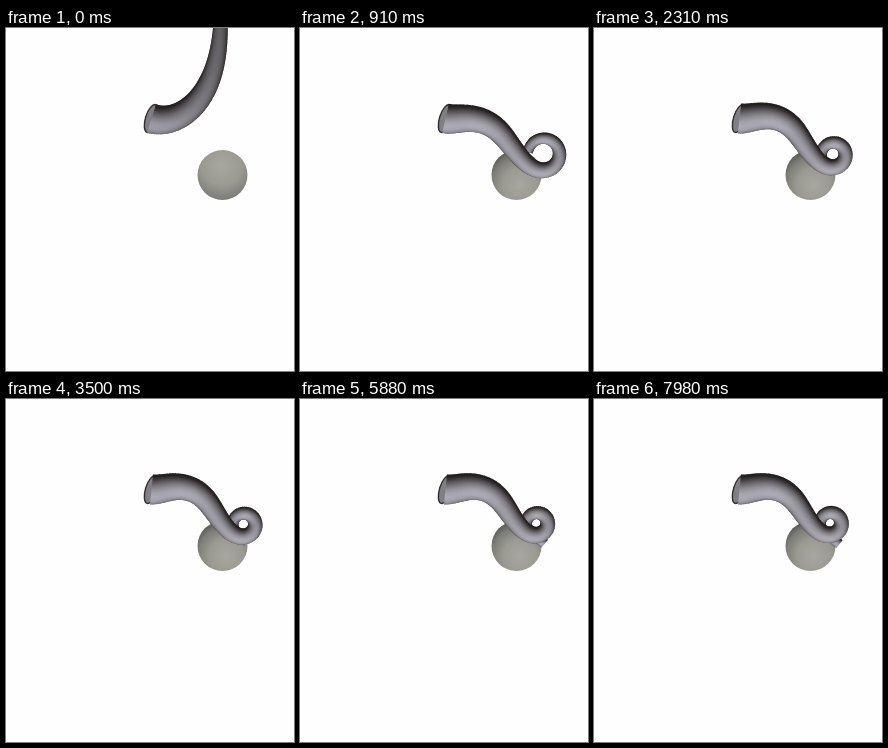
Recreate the animation shown at these times as an HTML page with a canvas. Size 288x343 px, loop 8 s.

```html
<!DOCTYPE html>
<html lang="en">
<head>
<meta charset="utf-8">
<title>Curling tentacle</title>
<style>
html, body { margin: 0; width: 100%; height: 100%; overflow: hidden; background: #fefefe; }
canvas { display: block; width: 288px; height: 343px; }
</style>
</head>
<body>
<canvas id="stage" width="288" height="343"></canvas>
<script>
const ctx = document.getElementById('stage').getContext('2d');
const LOOP = 8000, STEP = 70, FALL = 140, LANDED = 350;
const N = 150, LENGTH = 191;
const ROOT = { x: 145.5, y: 90.5 };
const LIGHT = { x: -0.1, y: 0.52, z: 0.85 };
const DARK = [36, 31, 31], PALE = [172, 171, 181];

const mix = (a, b, k) => a + (b - a) * k;
const clamp = v => Math.max(0, Math.min(1, v));
const smooth = (a, b, v) => {
  const k = clamp((v - a) / (b - a));
  return k * k * (3 - 2 * k);
};

const radius = s => 5 + 10 * (1 - s) ** 1.3;

// Headings along the tentacle, s running from root (0) to tip (1).
const raised = s => 0.3 - 2.1 * (1 - Math.exp(-3 * s));

// The arm sags, then winds up; loose goes from 1 (open hook) to 0 (tight coil).
function lowered(s, loose) {
  const open = loose * loose, soft = 0.04;
  const from = 0.53 + 0.1 * loose - 0.135 * open;
  const sag = -0.2 + 0.4 * open + (1.2 - 0.65 * open) * smooth(0.05, 0.38, s);
  const coil = (18 - 10.6 * loose) * soft * Math.log(1 + Math.exp((s - from) / soft));
  return Math.max(sag - coil, -5.6) + 0.3 * Math.exp(-s / 0.02);
}

function headingAt(t) {
  const drop = t < FALL ? 0 : clamp((t - FALL + STEP) / (LANDED - FALL + STEP));
  const since = Math.max(0, t - LANDED);
  const loose = Math.exp(-((since / 1100) ** 0.8));
  const swing = 0.07 * Math.sin(Math.PI * clamp(since / 350));
  return s => mix(raised(s), lowered(s, loose) + swing, drop);
}

function drawBall(settled) {
  const x = mix(216, 220, settled), y = mix(138, 157, settled);
  const g = ctx.createRadialGradient(x, y, 0, x, y, mix(44, 38, settled));
  g.addColorStop(0, '#a8a8a1');
  g.addColorStop(0.45, '#9a9a93');
  g.addColorStop(0.75, '#7d7d77');
  g.addColorStop(1, '#4f4f4b');
  ctx.fillStyle = g;
  ctx.beginPath();
  ctx.arc(216.5, 147, 25, 0, 7);
  ctx.fill();
}

function drawCap() {
  ctx.beginPath();
  ctx.ellipse(ROOT.x, ROOT.y, 6, 14.6, 0.3, 0, 7);
  ctx.fillStyle = '#807f85';
  ctx.fill();
  ctx.strokeStyle = '#332f30';
  ctx.lineWidth = 1.4;
  ctx.stroke();
}

// Points on both edges of the tube, with the normal between them.
function traceTube(heading) {
  const step = LENGTH / N, joints = [];
  let { x, y } = ROOT;
  for (let i = 0; i <= N; i++) {
    const a = heading(i / N), r = radius(i / N);
    const nx = -Math.sin(a), ny = Math.cos(a);
    joints.push({
      a, nx, ny,
      x0: x - nx * r, y0: y - ny * r,
      x1: x + nx * r, y1: y + ny * r
    });
    const mid = heading((i + 0.5) / N);
    x += step * Math.cos(mid);
    y += step * Math.sin(mid);
  }
  return joints;
}

function crossShade(p, fade) {
  const g = ctx.createLinearGradient(p.x0, p.y0, p.x1, p.y1);
  const side = p.nx * LIGHT.x + p.ny * LIGHT.y;
  for (let k = 0; k <= 12; k++) {
    const angle = (k / 6 - 1) * Math.PI / 2;
    const lit = clamp(Math.sin(angle) * side + Math.cos(angle) * LIGHT.z) ** 1.4 * fade;
    const rgb = DARK.map((c, n) => Math.round(mix(c, PALE[n], lit)));
    g.addColorStop((Math.sin(angle) + 1) / 2, `rgb(${rgb})`);
  }
  return g;
}

function drawTube(heading, dim) {
  const joints = traceTube(heading);
  // The root lies in front, so paint from the tip back.
  for (let i = N - 1; i >= 0; i--) {
    const p = joints[i], q = joints[i + 1];
    const ex = Math.cos(q.a) * 0.8, ey = Math.sin(q.a) * 0.8;
    ctx.fillStyle = crossShade(p, 1 - dim * (0.1 + 0.5 * i / N));
    ctx.beginPath();
    ctx.moveTo(p.x0, p.y0);
    ctx.lineTo(p.x1, p.y1);
    ctx.lineTo(q.x1 + ex, q.y1 + ey);
    ctx.lineTo(q.x0 + ex, q.y0 + ey);
    ctx.fill();
  }
}

function draw(ms) {
  const t = Math.floor((ms % LOOP) / STEP) * STEP;
  const settled = t < FALL ? 0 : clamp((t - STEP) / (LANDED - STEP));
  ctx.fillStyle = '#fefefe';
  ctx.fillRect(0, 0, 288, 343);
  drawBall(settled);
  drawCap();
  drawTube(headingAt(t), 1 - settled);
}

const start = performance.now();
function tick() {
  draw(performance.now() - start);
  requestAnimationFrame(tick);
}
tick();
</script>
</body>
</html>
```
